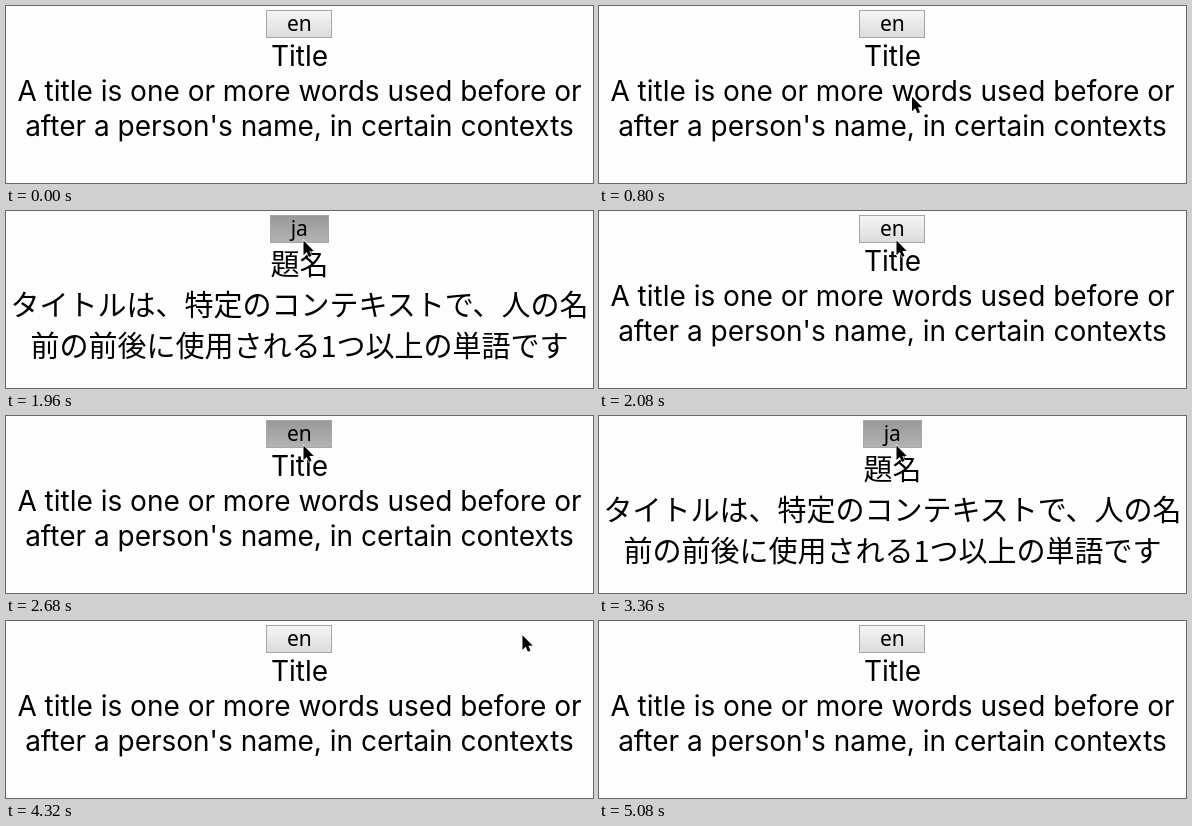
Animation, 587 px wide and 177 px high, one loop 5.2 s. Source, as an HTML page:

```html
<!DOCTYPE html>
<html lang="en">
<head>
<meta charset="utf-8">
<style>
  html, body { margin: 0; width: 100%; height: 100%; overflow: hidden; background: #fdfdfe; }
  svg { display: block; width: 587px; height: 177px; }
  text { text-anchor: middle; fill: #000; }
  #en { font: 28px Inter, sans-serif; font-optical-sizing: none; }
  #ja { font: 29px "Noto Sans CJK JP", "Noto Sans CJK", sans-serif; }
  #label { font: 21px "Noto Sans", sans-serif; }
</style>
</head>
<body>
<svg viewBox="0 0 587 177">
  <defs>
    <linearGradient id="idle" x2="0" y2="1">
      <stop stop-color="#f5f5f5"/><stop offset="1" stop-color="#dcdcdc"/>
    </linearGradient>
    <linearGradient id="pressed" x2="0" y2="1">
      <stop stop-color="#989898"/><stop offset="1" stop-color="#b4b4b4"/>
    </linearGradient>
  </defs>
  <rect id="button" y="4.5" height="27" stroke="#a6a6a6"/>
  <text id="label" x="293.3" y="24.5"></text>
  <g id="en">
    <text x="293.5" y="60">Title</text>
    <text x="293.5" y="95">A title is one or more words used before or</text>
    <text x="293.5" y="130">after a person's name, in certain contexts</text>
  </g>
  <g id="ja" lang="ja">
    <text x="293.5" y="64">題名</text>
    <text x="293.5" y="105">タイトルは、特定のコンテキストで、人の名</text>
    <text x="293.5" y="146">前の前後に使用される1つ以上の単語です</text>
  </g>
  <path id="cursor" d="M0 0V14.5L3.3 11.4 5.5 16.4 8 15.3 5.9 10.5H10.3Z" stroke="#fff" stroke-width="1.2" paint-order="stroke"/>
</svg>
<script>
const LOOP = 5200, STEP = 40;
const clicks = [[1280, 1360], [1960, 2080], [2680, 2760], [3360, 3440]];  // press, release
const rest = [297.5, 29.5], entry = [335, 178], exit = [592, 9];
const $ = id => document.getElementById(id);
const progress = (t, from, to) => Math.min(1, Math.max(0, (t - from) / (to - from)));
const easeOut = p => 1 - (1 - p) ** 2;
const easeIn = p => p ** 1.7;
const mix = (a, b, p) => a.map((v, i) => v + (b[i] - v) * p);

function draw(t) {
  const lang = clicks.filter(c => t >= c[1]).length % 2 ? 'ja' : 'en';
  const down = clicks.some(c => t >= c[0] && t < c[1]);
  for (const id of ['en', 'ja']) $(id).style.display = id === lang ? '' : 'none';
  $('label').textContent = lang;

  const width = lang === 'en' ? 65 : 58;
  $('button').setAttribute('x', lang === 'en' ? 260.5 : 264.5);
  $('button').setAttribute('width', width);
  $('button').setAttribute('fill', down ? 'url(#pressed)' : 'url(#idle)');

  const [x, y] = t < 3880
    ? mix(entry, rest, easeOut(progress(t, 600, 1160)))
    : mix(rest, exit, easeIn(progress(t, 3900, 4400)));
  $('cursor').setAttribute('transform', `translate(${x} ${y})`);
  $('cursor').style.display = t >= 640 && t < 4400 ? '' : 'none';
}

const start = performance.now();
function frame() {
  const t = (performance.now() - start) % LOOP;
  draw(t - t % STEP);
  requestAnimationFrame(frame);
}
frame();
</script>
</body>
</html>
```
